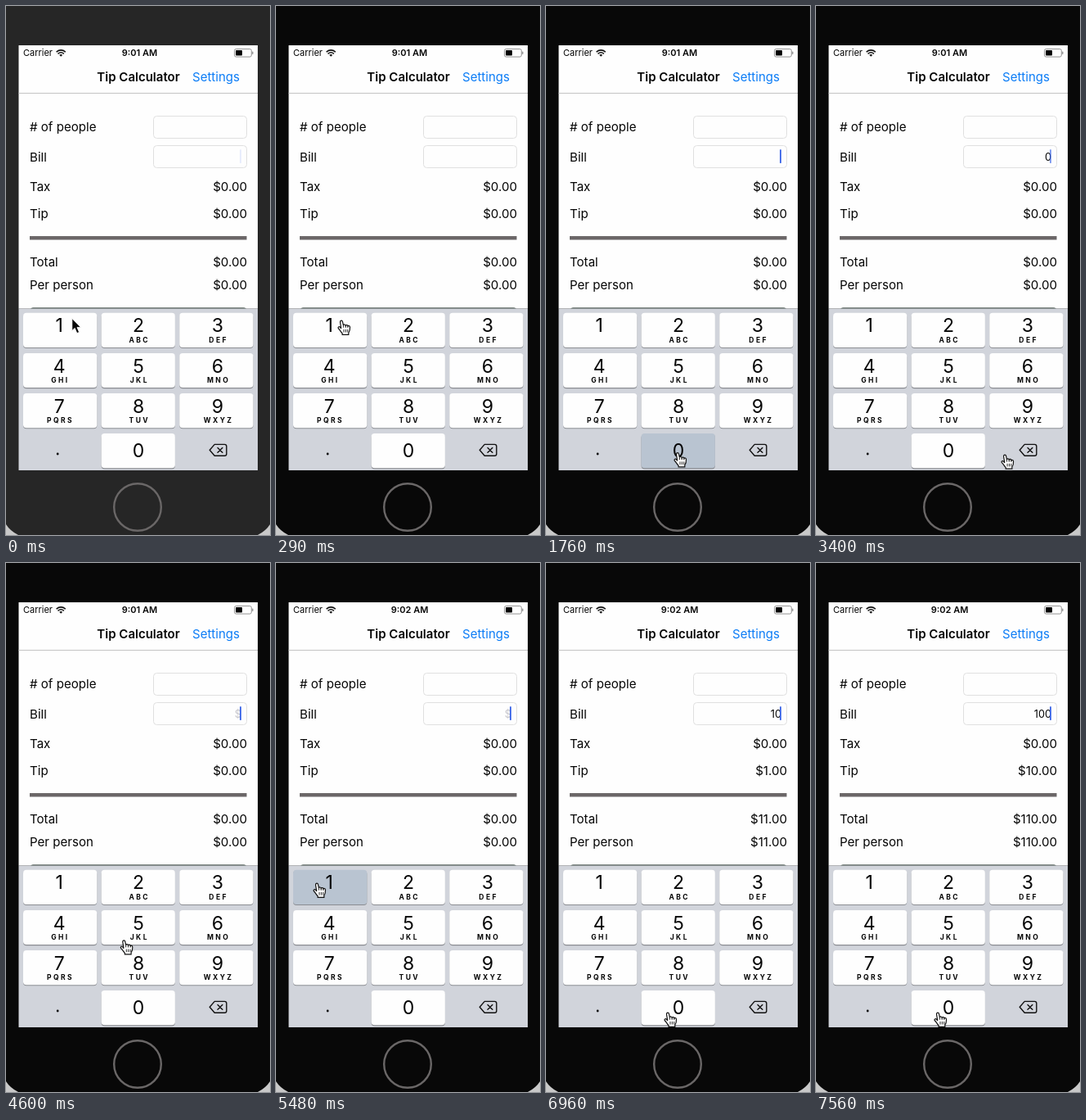
Write an HTML page that moves like this. It is 323 px wide and 646 px high and loops after 8000 ms.

```html
<!DOCTYPE html>
<html lang="en">
<head>
<meta charset="utf-8">
<title>Tip Calculator</title>
<style>
  html, body { margin: 0; width: 100%; height: 100%; overflow: hidden; background: #080808; }
  svg { display: block; width: 323px; height: 646px; }
  text { font: 15.1px Inter, "Open Sans", sans-serif; fill: #050505; }
  .status { font-size: 11px; }
  .bold { font-weight: 600; }
  .title { font-size: 15px; }
  .link { font-size: 15px; fill: #0b7cf6; }
  .digit { font-size: 23px; }
  .letters { font-size: 8.5px; font-weight: 700; letter-spacing: 2.4px; }
  .input { font-size: 12.7px; }
  .hint { fill: #c7c7cd; }
</style>
</head>
<body>
<svg id="stage" viewBox="0 0 323 646" xmlns="http://www.w3.org/2000/svg"></svg>
<script>
const LOOP = 8000;
const STEP = 148.2;
const LEAD = 19;
const NS = 'http://www.w3.org/2000/svg';
const stage = document.getElementById('stage');

function add(tag, attrs, content = '') {
  const el = document.createElementNS(NS, tag);
  for (const name in attrs) el.setAttribute(name, attrs[name]);
  el.textContent = content;
  return stage.appendChild(el);
}

const rect = (x, y, width, height, fill, rx = 0, more = {}) =>
  add('rect', { x, y, width, height, fill, rx, ...more });

const label = (x, y, content, cls = '', anchor = 'start') =>
  add('text', { x, y, class: cls, 'text-anchor': anchor }, content);

const line = (d, width, more = {}) =>
  add('path', { d, fill: 'none', stroke: '#111', 'stroke-width': width, ...more });

// Phone body
const body = rect(0, 0, 323, 646, '#080808');
for (const flip of ['', 'translate(323 0) scale(-1 1)']) {
  add('path', { d: 'M0 633Q5 641 15 646H0Z', fill: '#c9c9c9', transform: flip });
}
add('circle', { cx: 161, cy: 612, r: 28.8, fill: 'none', stroke: '#6a6767', 'stroke-width': 2.4 });
rect(15.5, 48, 292.5, 321.6, '#fefefe');

// Status bar
label(21, 61.4, 'Carrier', 'status');
const clock = label(163.5, 61.4, '', 'status bold', 'middle');
line('M61.6 56.2Q67.2 51.6 72.8 56.2M63.5 58.3Q67.2 55.3 70.9 58.3', 1.5);
add('path', { d: 'M65.2 59.8Q67.2 58.3 69.2 59.8L67.2 61.8Z', fill: '#111' });
rect(279.5, 52.5, 20.8, 9.6, 'none', 2, { stroke: '#888', 'stroke-width': 0.9 });
rect(281, 54, 8, 6.6, '#050505', 0.8);
rect(301.2, 55.6, 1.2, 3.4, '#888', 0.6);

// Navigation bar
label(162, 92, 'Tip Calculator', 'title bold', 'middle');
label(257, 92, 'Settings', 'link', 'middle');
rect(15.5, 106, 292.5, 1, '#c4c4c4');

// Form
for (const y of [134.5, 170.5]) {
  rect(180.5, y, 114, 27, '#fefefe', 4, { stroke: '#e0e0e0', 'stroke-width': 1 });
}
label(29, 153, '# of people');
label(29, 189.5, 'Bill');
rect(29, 281, 265.5, 4.5, '#6b6768');
rect(29.5, 368.2, 265, 20, '#55615c', 4);

function amountRow(name, y) {
  label(29, y, name);
  return label(295, y, '', '', 'end');
}
const tax = amountRow('Tax', 226);
const tip = amountRow('Tip', 258.6);
const total = amountRow('Total', 318.4);
const perPerson = amountRow('Per person', 346.4);
const input = label(288, 188.8, '', 'input', 'end');
const caret = rect(286, 175.3, 1.9, 16.6, '#426be8');

// Keypad
rect(15.5, 369.6, 292.5, 197.4, '#d1d4db');
const letters = ['', '', 'ABC', 'DEF', 'GHI', 'JKL', 'MNO', 'PQRS', 'TUV', 'WXYZ'];

function key(digit) {
  const slot = digit ? digit - 1 : 10;
  const column = slot % 3;
  const x = 21 + 95.6 * column;
  const y = 374.8 + 49.1 * Math.floor(slot / 3);
  const center = 65.3 + 96.8 * column;
  rect(x, y + 1, 90.3, 42.3, '#8b8d92', 4);
  const face = rect(x, y, 90.3, 42.2, '#fefefe', 4);
  label(center, y + (digit ? 23.6 : 28.9), digit, 'digit', 'middle');
  label(center + 1.2, y + 35.9, letters[digit], 'letters', 'middle');
  return face;
}
const faces = letters.map((_, digit) => key(digit));

add('circle', { cx: 63.2, cy: 547, r: 1.4, fill: '#050505' });
line('M255.2 535.4H267.5Q269.8 535.4 269.8 537.7V547Q269.8 549.3 267.5 549.3H255.2L249.2 542.3Z' +
  'M259 539.5L264.8 545.3M264.8 539.5L259 545.3', 1.4, { 'stroke-linejoin': 'round', 'stroke-linecap': 'round' });

// Pointers
const arrow = add('path', {
  d: 'M80.8 381.5V396.5L84.2 393.4L86.8 399.6L89.6 398.4L87 392.4H91.6Z',
  fill: '#080808', stroke: '#fff', 'stroke-width': 0.9
});
const hand = add('g', {});
hand.append(
  line('M-4.3 .9L-5.5 -6.8C-5.7 -9.3 -2.9 -9.5 -2.5 -7.3L-1.6 -3.1C-1.2 -4.5 .9 -4.3 1.2 -2.7' +
    'C1.7 -4 3.6 -3.6 3.9 -2.1C4.5 -3.1 6.4 -2.5 6.5 -.7C6.7 2.5 6 4.3 4.8 6.1V8.3H-2.9V6.7' +
    'C-4.5 5.2 -5.7 2.7 -7.7 .8C-8.7 -.8 -6.9 -2.1 -5.6 -.8Z', 1.2, { fill: '#fff' }),
  line('M-1 1.9V5.5M1.4 1.9V5.5M3.7 1.9V5.5M-1.6 -3.1V-.3M1.2 -2.7V-.2M3.9 -2.1V-.1', 0.9)
);

// What the bill holds after each tap
const taps = [
  { at: 1900, bill: '0' },
  { at: 4270, bill: '' },
  { at: 5600, bill: '1' },
  { at: 6940, bill: '10' },
  { at: 7530, bill: '100' }
];
const home = { x: 84, y: 393 };
const glides = [
  { at: 290, lasts: 900, x: 165, y: 554.5 },
  { at: 3241, lasts: 470, x: 268, y: 558 },
  { at: 4427, lasts: 620, x: 54, y: 400 },
  { at: 5762, lasts: 800, x: 153, y: 558 }
];

const clamp = v => Math.min(1, Math.max(0, v));
const easeOut = u => 1 - (1 - u) ** 3;
const money = value => '$' + value.toFixed(2);

function handAt(t) {
  return glides.reduce((from, to) => {
    const p = easeOut(clamp((t - to.at) / to.lasts));
    return { x: from.x + (to.x - from.x) * p, y: from.y + (to.y - from.y) * p };
  }, home);
}

// Stays on, fades out, then blinks back on; every tap restarts it.
function caretOpacity(sinceTap) {
  return clamp((630 - sinceTap % 1030) / 250);
}

function render(t) {
  const last = taps.filter(tap => tap.at <= t).pop();
  const next = taps.find(tap => tap.at > t);
  const bill = last ? last.bill : '';
  const amount = Number(bill);
  const pressed = next && next.bill && t > next.at - 160 ? Number(next.bill.slice(-1)) : -1;
  const early = t < 120;

  body.setAttribute('fill', early ? '#262626' : '#080808');
  arrow.style.opacity = early ? 1 : 0;
  hand.style.opacity = early ? 0 : 1;
  const { x, y } = handAt(t);
  hand.setAttribute('transform', `translate(${x} ${y})`);

  clock.textContent = t < 5000 ? '9:01 AM' : '9:02 AM';
  input.textContent = bill || (last ? '$' : '');
  input.classList.toggle('hint', !bill);
  caret.style.opacity = caretOpacity(t - (last ? last.at : -600));

  tax.textContent = money(0);
  tip.textContent = money(amount * 0.1);
  total.textContent = perPerson.textContent = money(amount * 1.1);
  faces.forEach((face, digit) => face.setAttribute('fill', digit === pressed ? '#b9c4d1' : '#fefefe'));
}

function tick() {
  const t = performance.now() % LOOP;
  const step = Math.floor((t + LEAD) / STEP);
  render(Math.max(0, step * STEP - LEAD));
  requestAnimationFrame(tick);
}
tick();
</script>
</body>
</html>
```
